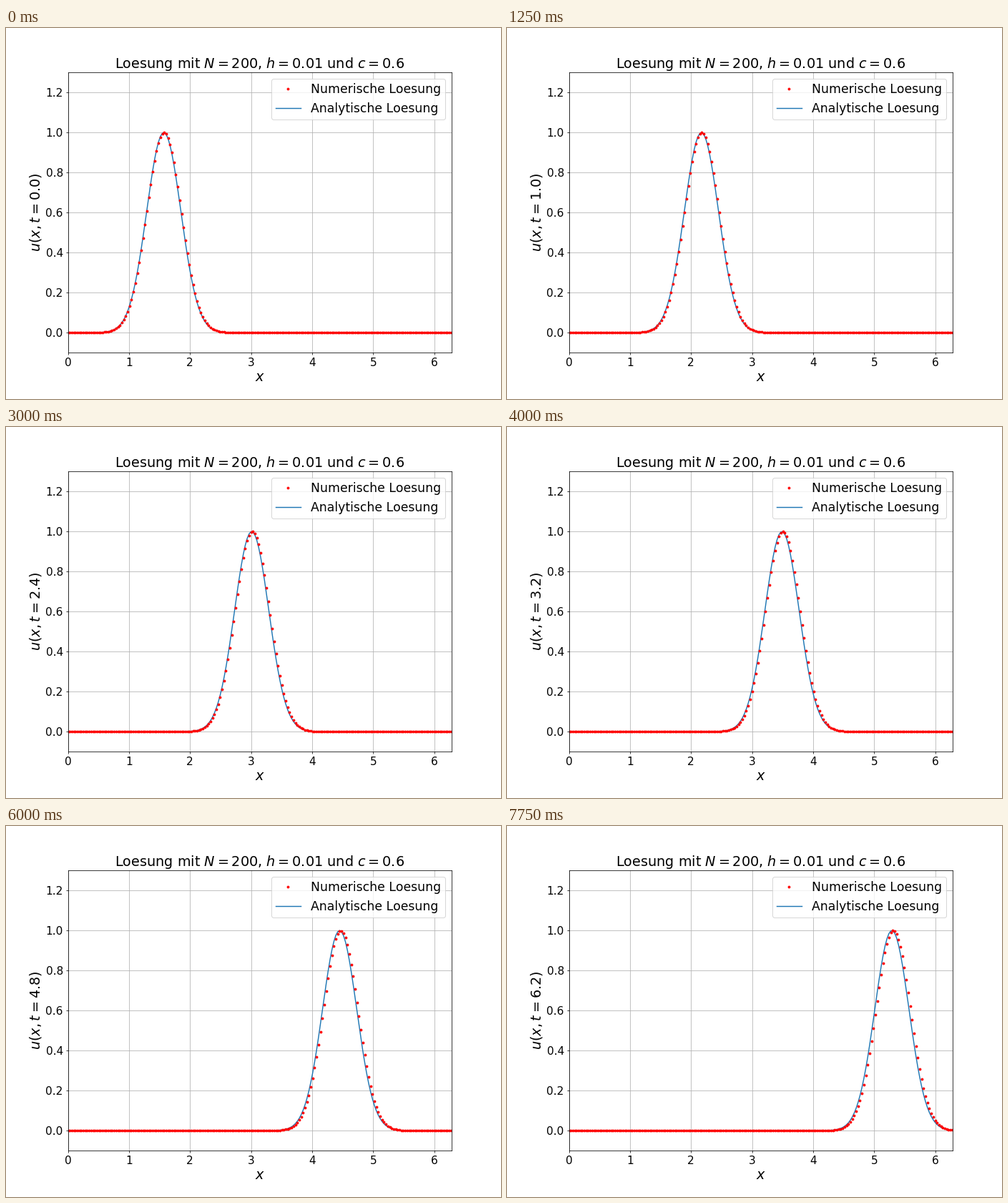
A matplotlib script that plays this animation: 692 by 519 pixels, repeating every 8 s.

```python
import matplotlib.pyplot as plt
import numpy as np
from matplotlib.animation import FuncAnimation

N = 200
STEP = 0.01
SPEED = 0.6
WIDTH = 0.28
DT = 0.2
FRAMES = 32
INTERVAL = 250

plt.rcParams["font.family"] = "DejaVu Sans"
plt.rcParams["text.kerning_factor"] = 6


def pulse(x, t):
    return np.exp(-(x - np.pi / 2 - SPEED * t) ** 2 / (2 * WIDTH ** 2))


x_plot = np.linspace(0, 2 * np.pi, N)
# The solver's nodes leave out the end point, so its wave drifts slightly ahead.
x_nodes = np.arange(N) * 2 * np.pi / N

fig, ax = plt.subplots(figsize=(10, 7.5), dpi=69.2)
fig.subplots_adjust(left=0.125, right=0.9, bottom=0.125, top=0.88)

dots, = ax.plot([], [], ".", color="red", zorder=2.2, label="Numerische Loesung")
curve, = ax.plot([], [], color="C0", label="Analytische Loesung")

ax.set_xlim(0, 2 * np.pi)
ax.set_ylim(-0.1, 1.3)
ax.set_title("Loesung mit $N=200$, $h=0.01$ und $c=0.6$", fontsize=20, pad=5)
ax.set_xlabel("$x$", fontsize=20, labelpad=3.5)
ax.tick_params(labelsize=16)
ax.grid(True)
ax.legend(loc="upper right", fontsize=18, borderpad=0.37)


def update(i):
    t = i * DT
    # The numerical wave trails by half a time step.
    dots.set_data(x_plot, pulse(x_nodes, t - STEP / 2))
    curve.set_data(x_plot, pulse(x_plot, t))
    ax.set_ylabel(f"$u(x,t={t:.1f})$", fontsize=20)
    return dots, curve


anim = FuncAnimation(fig, update, frames=FRAMES, interval=INTERVAL,
                     repeat=True, repeat_delay=0, blit=False)
plt.show()
```
